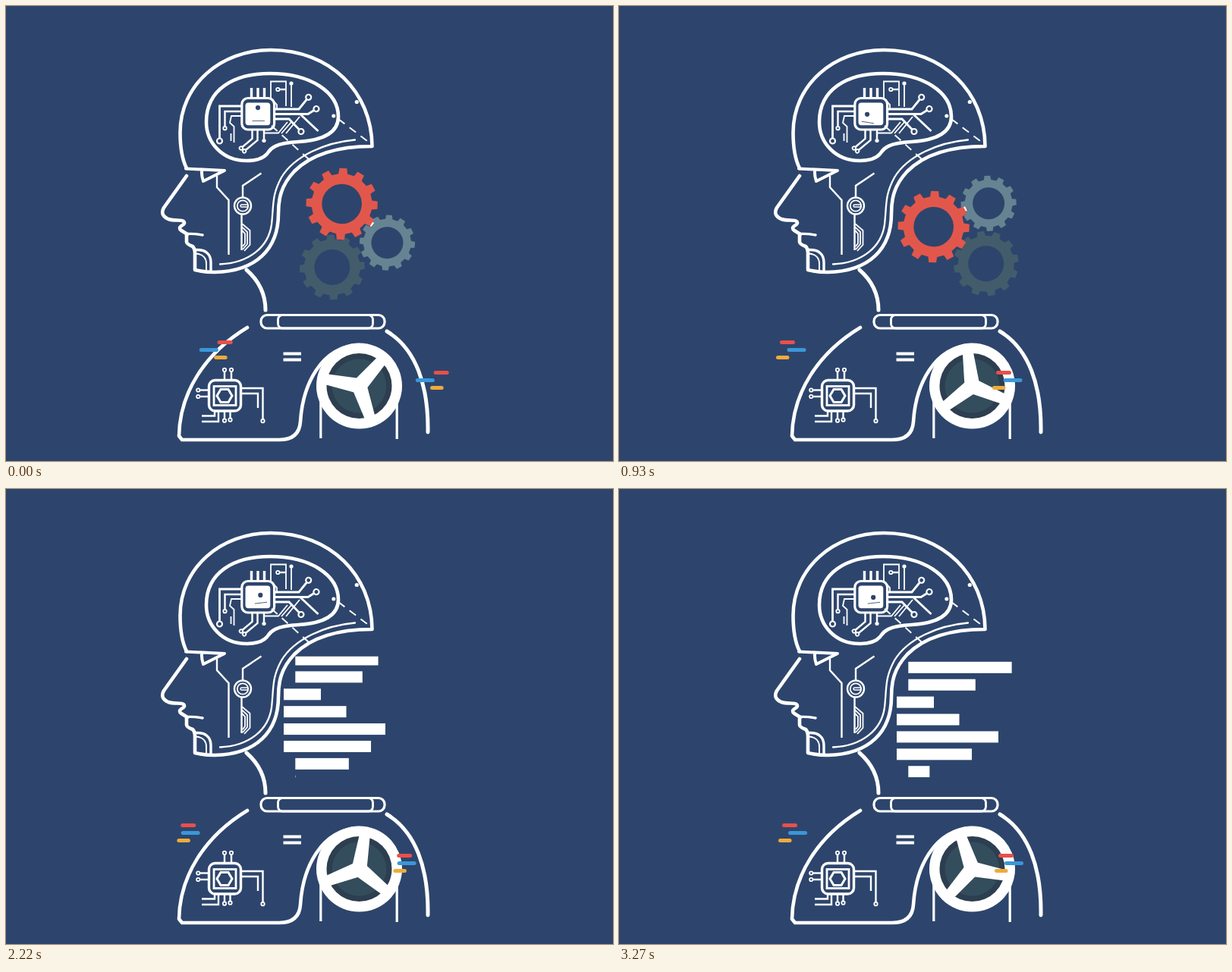
Animation of 800x600 px, one loop 3.3 s. Source, as an HTML page:

```html
<!DOCTYPE html>
<html lang="en">
<head>
<meta charset="utf-8">
<title>Thinking robot</title>
<style>
html, body { margin: 0; width: 100%; height: 100%; overflow: hidden; background: #2d456c; }
svg { display: block; width: 800px; height: 600px; }
marker { overflow: visible; }
.line, .wire, marker { fill: none; stroke: #fff; }
.line { stroke-linecap: round; stroke-linejoin: round; }
.big path { marker-end: url(#bigRing); }
.small path { marker-end: url(#smallRing); }
</style>
</head>
<body>
<svg viewBox="0 0 800 600">
  <clipPath id="window"><rect x="340" y="220.7" width="220" height="159.6"/></clipPath>
  <marker id="bigRing" orient="auto" markerUnits="userSpaceOnUse"><circle cx="3.5" r="3.5" stroke-width="2.2"/></marker>
  <marker id="smallRing" orient="auto" markerUnits="userSpaceOnUse"><circle cx="2.2" r="2.2" stroke-width="1.8"/></marker>

  <!-- Head and body outlines -->
  <g class="line" stroke-width="4.6">
    <path d="M238 214C231 200 229.5 183 229.5 167C229.5 104 283 58 349 58C428 58 482 114 482.500 185C440 185 404 194 380 218C362 237 359 255 359 274C359 320 330 350 275 351Q262 351 249 348V326Q249 320 246 317Q238 314 238 311V302"/>
    <path d="M237 214.5L288 217L260 231Q257.5 224 258 217" stroke-width="4"/>
    <path d="M238 224L208 266C204 273 207 278 214 281C222 284 230 281 234 284Q237 287 231 290Q227 293 231 296L239 301"/>
    <path d="M238 300.5Q250 300 259 302M250 321.5C263 321 270 327 270 338V348" stroke-width="3.4"/>
    <path d="M250 326.5C259 327 264 332 264 340V348" stroke-width="2"/>
    <path d="M282 340.5C320 339 346 318 350 288C353 262 350 250 363 226C380 198 420 180 460 176.5" stroke-width="2.3"/>
    <path d="M317 204C285 204 264 180 264 153C264 110 300 89 348 89C402 89 438 114 438 146C438 168 416 177 386 179C350 181 348 190 344 195C338 202 328 204 317 204Z"/>
    <path d="M317 348C333 362 342 380 342 401M502 429C540 452 557 500 556 562" stroke-width="5"/>
    <path d="M318 424C262 458 229 510 228 567L232 572H360C378 572 387 564 388 548C391 500 415 449 465 447"/>
    <rect x="336" y="407.5" width="163" height="17.5" rx="8" stroke-width="3.2"/>
    <rect x="358.5" y="407.5" width="125" height="17.5" rx="6" stroke-width="2.8"/>
  </g>

  <!-- Circuits -->
  <g class="wire" stroke-width="2.4">
    <path d="M438 149L480 181M399 202L350 158" stroke-width="2" stroke-dasharray="10.500 8"/>
    <path d="M278 224V239L293.5 256V328M312 252V237L336.5 220.5M310.5 274V322"/>
    <path d="M311 287L321.5 296V315L314 323M311 291.5L318 298V314L312 321M311 296L315 300V313L312 317" stroke-width="1.8"/>
    <circle cx="312" cy="263.5" r="11"/>
    <circle cx="312" cy="263.5" r="7.2" stroke-width="1.8"/>
    <rect x="309" y="262" width="10" height="3" rx="1.5" stroke-width="1.5"/>

    <rect x="310.8" y="121.5" width="42.8" height="41.5" rx="8" stroke-width="3.2"/>
    <path d="M323.5 120V108M332 120V108M340.5 120V108" stroke-width="3.4"/>
    <path d="M387 142L411.5 165" stroke-width="2.8"/>
    <path d="M310 145H297L295 154L300.5 159V180M296.5 168V178M349 122V99.5H369V132M349 122L357 130V136M376 104V133M341 167.5H359L371 153M363 168L377 152M369 168L387 146" stroke-width="1.8"/>
    <path d="M340 163V175"/>
    <g class="big" stroke-width="2.8">
      <path d="M310 132H281.5V174.5"/><path d="M354 136H386L396.500 123"/>
      <path d="M354 142.500H398L406 137.500"/><path d="M354 149H373L386.500 163"/>
    </g>
    <g class="small">
      <path d="M310 139H288.5V159"/><path d="M369 110H360.500"/>
      <path d="M331.5 163V177L315.800 190"/><path d="M324.5 163V175L311.500 186"/>
      <path d="M288 493.5V482"/><path d="M297 493.5V482"/>
      <path d="M267 506.5H255.500"/><path d="M267 515H255.500"/>
      <path d="M288 534V544.500"/><path d="M295.5 534V543.500"/>
      <path d="M309 504H338.5V545"/>
    </g>

    <rect x="267.5" y="493.5" width="42" height="40.5" rx="8" stroke-width="3.4"/>
    <rect x="274" y="501.5" width="29" height="25" stroke-width="2.8"/>
    <path d="M278 514L283 505.5H293L298 514L293 522.5H283Z" stroke-width="3"/>
    <path d="M280 534V548H258M275 534V540.5H258M309 511H332V530"/>
    <path d="M414.8 516V570M515.2 516V571" stroke-width="3.2"/>
    <path d="M365.5 458.5H389M365.5 466.5H389" stroke-width="4"/>
  </g>
  <g fill="#fff">
    <circle cx="462.3" cy="126.5" r="2.6"/><circle cx="431.8" cy="145" r="2.5"/>
    <circle cx="376" cy="102" r="2.6"/><circle cx="340" cy="177.5" r="2.6"/>
    <rect x="315.5" y="127.5" width="32.8" height="29.8" rx="4"/>
  </g>
  <path id="mouth" d="M-8.2 0H8.2" stroke="#2d456c" stroke-width="0.8"/>
  <circle id="eye" r="3.1" fill="#2d456c"/>

  <g transform="translate(465.5 501)">
    <circle r="56.5" fill="#fff"/>
    <circle r="43" fill="#2c3e50"/>
    <circle r="35.8" fill="#334d5c"/>
    <g id="wheel" fill="#fff"></g>
  </g>

  <g id="gears"></g>
  <g clip-path="url(#window)"><g id="code" fill="#fff"></g></g>
  <g id="dashes"></g>
</svg>

<script>
const TAU = 2 * Math.PI;
const $ = id => document.getElementById(id);
const clamp = x => Math.min(1, Math.max(0, x));
const wave = p => (1 - Math.cos(Math.PI * clamp(p))) / 2;
const outCubic = p => 1 - (1 - clamp(p)) ** 3;
const inOutCubic = p => p < 0.5 ? 4 * p ** 3 : 1 - 4 * (1 - p) ** 3;

function set(el, attrs) {
  for (const k in attrs) el.setAttribute(k, attrs[k]);
}
function add(parent, tag, attrs) {
  const el = document.createElementNS("http://www.w3.org/2000/svg", tag);
  set(el, attrs);
  return parent.appendChild(el);
}

for (let i = 0; i < 3; i++)
  add($("wheel"), "path", { d: "M0 -10L45 -7V7L0 10Z", transform: `rotate(${i * 120})` });

// Twelve-toothed gears that turn while circling a common hub
const HUB = [453, 298.6];
function gearPath(outer, root, hole) {
  const at = (r, deg) => {
    const a = deg * TAU / 360;
    return `${r * Math.sin(a)} ${-r * Math.cos(a)}`;
  };
  const pts = [];
  for (let a = 0; a < 360; a += 30)
    pts.push(at(root, a - 8.5), at(outer, a - 6), at(outer, a + 6), at(root, a + 8.5));
  const arc = `A${hole} ${hole} 0 1 0 0 `;
  return `M${pts.join("L")}ZM0 ${-hole}${arc}${hole}${arc}${-hole}Z`;
}
function gear(x, y, outer, root, hole, fill, start, dir) {
  const el = add($("gears"), "path", { d: gearPath(outer, root, hole), fill, "fill-rule": "evenodd" });
  return { el, x, y, start, dir };
}
const gears = [
  gear(430, 344.5, 43, 37, 23.5, "#425c6c", -3, -1),
  gear(502.5, 312, 36.7, 31.5, 21, "#668392", 4, -1)
];
add($("gears"), "path", { d: "M480 290L484 285", stroke: "#fff", "stroke-width": 3 });
gears.push(gear(442.5, 261, 47.3, 40, 26.3, "#e2574c", 2, 1));

// Six code lines that repeat; the first two are indented
const WIDTHS = [140, 88.5, 49, 82.5, 134, 115.5];
const PITCH = 22.9;
const bars = Array.from({ length: 10 }, () => add($("code"), "rect", { height: 15 }));

// Two groups of speed dashes
function dash(x, y, width, travel, fill) {
  return [0, 1].map(n => ({
    el: add($("dashes"), "rect", { y: y + 40 * n, width, height: 5, rx: 2.5, fill }),
    x: x + 285 * n, travel
  }));
}
const dashes = [
  ...dash(211.5, 441, 20, 67.5, "#e8504a"),
  ...dash(221.3, 451, 25, 33.7, "#3b97d8"),
  ...dash(206.5, 461, 17.5, 68, "#efab3a")
];

// The face glances right, left, right and nods three times per 1800 ms
function drawFace(t) {
  const a = TAU * t / 1800;
  const look = 2.5 * Math.cos(a) - 2.8 * Math.cos(2 * a);
  set($("eye"), { cx: 332.3 + look, cy: 138.6 - 4.5 * Math.cos(3 * a) });
  set($("mouth"), {
    transform: `translate(${333 + look} ${151.4 - 0.4 * look}) rotate(${-1 - 1.9 * look})`
  });
}

function drawGears(t) {
  const turn = 360 * inOutCubic(clamp((t + 78) / 1560));
  const size = 1 - clamp((t - 1350) / 130) ** 3;
  const [x, y] = HUB;
  set($("gears"), {
    visibility: t < 1480 ? "visible" : "hidden",
    transform: `translate(${x} ${y}) rotate(${turn}) scale(${size}) translate(${-x} ${-y})`
  });
  for (const g of gears)
    set(g.el, { transform: `translate(${g.x} ${g.y}) rotate(${g.start + g.dir * 0.0358 * t})` });
}

function drawCode(t) {
  const size = outCubic((t - 1480) / 333);
  set($("code"), {
    visibility: t >= 1480 ? "visible" : "hidden",
    transform: `translate(448 295) scale(${size}) translate(-448 -295)`
  });
  const base = 355 - 0.121 * (t - 2220);
  const first = Math.ceil((195 - base) / PITCH);
  bars.forEach((bar, i) => {
    const y = base + (first + i) * PITCH;
    const row = (first + i + 60) % 6;
    // Lines type out at the bottom and shrink at the top
    const shown = wave((380 - y) / 50) * wave((y - 183) / 50);
    set(bar, { x: row < 2 ? 381.3 : 366, y, width: WIDTHS[row] * shown });
  });
}

function draw(t) {
  const slide = (1 + Math.cos(TAU * (t - 15) / 600)) / 2;
  for (const d of dashes) set(d.el, { x: d.x + d.travel * slide });
  const sway = 4.5 * Math.sin(TAU * (t + 60) / 1200);
  set($("wheel"), { transform: `rotate(${72.5 + 0.2 * t - sway})` });
  drawFace(t);
  drawGears(t);
  drawCode(t);
}

const start = performance.now();
function tick(now) {
  draw(Math.max(0, now - start) % 3300);
  requestAnimationFrame(tick);
}
draw(0);
requestAnimationFrame(tick);
</script>
</body>
</html>
```
